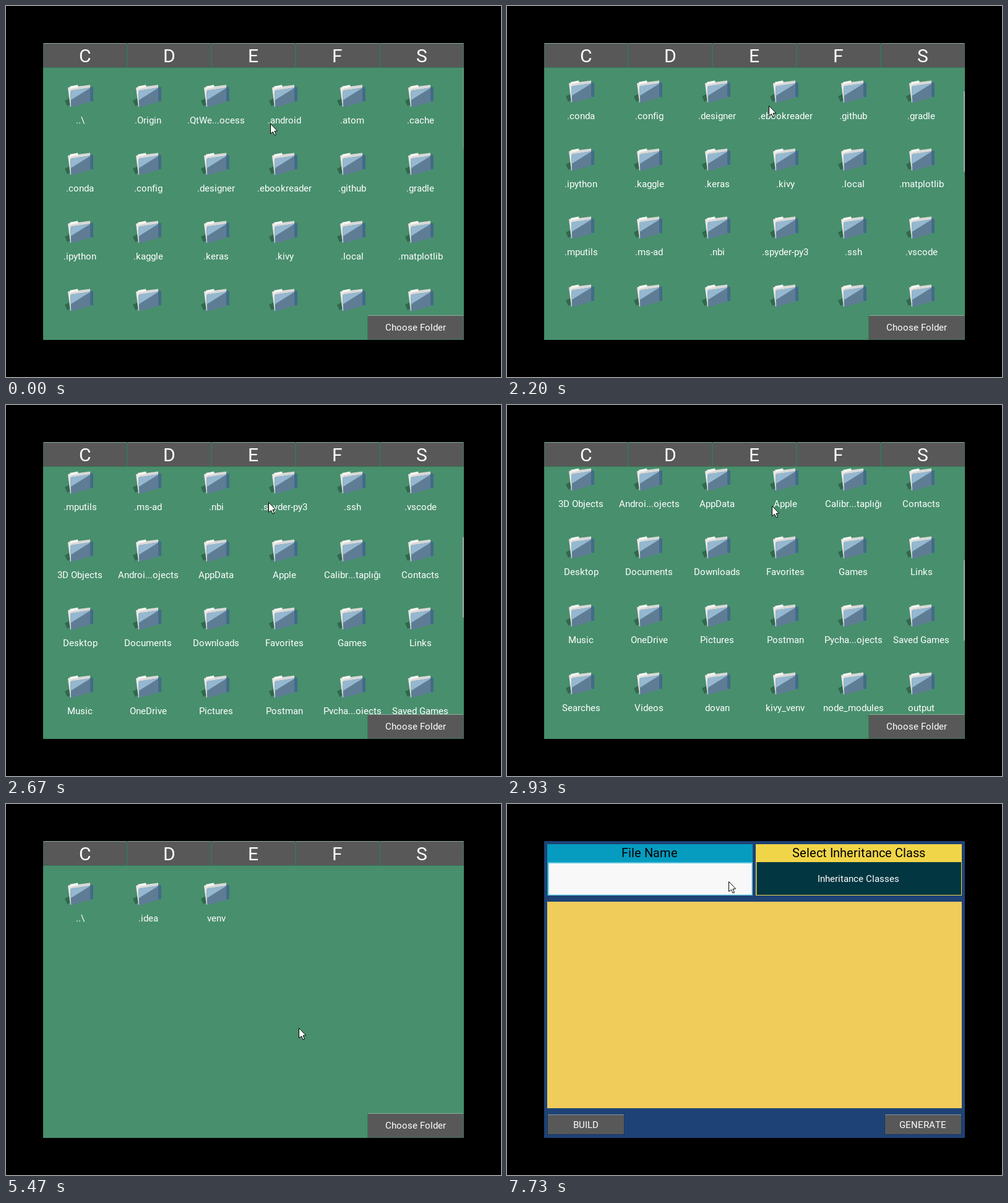
Write an HTML page with a canvas that moves like this. It is 800 px wide and 600 px high and loops after 8000 ms.

```html
<!DOCTYPE html>
<html>
<head>
<meta charset="utf-8">
<style>
html, body { margin: 0; width: 100%; height: 100%; overflow: hidden; background: #000; }
canvas { display: block; }
</style>
</head>
<body>
<canvas id="stage" width="800" height="600"></canvas>
<script>
const ctx = document.getElementById('stage').getContext('2d');
const LOOP = 8000, STEP = 1000 / 15;
const GREEN = '#488f6d', GREY = '#585858';

// Steps at which the screens change
const OPEN_PROJECTS = 63, OPEN_PROJECT = 77, CLOSE = 90, FOCUS = 108, BLINK = 116;

// Entries are "name" for folders and "name:size" for files.
const home = ('..\\|.Origin|.QtWe...ocess|.android|.atom|.cache|' +
  '.conda|.config|.designer|.ebookreader|.github|.gradle|' +
  '.ipython|.kaggle|.keras|.kivy|.local|.matplotlib|' +
  '.mputils|.ms-ad|.nbi|.spyder-py3|.ssh|.vscode|' +
  '3D Objects|Androi...ojects|AppData|Apple|Calibr...taplığı|Contacts|' +
  'Desktop|Documents|Downloads|Favorites|Games|Links|' +
  'Music|OneDrive|Pictures|Postman|Pycha...ojects|Saved Games|' +
  'Searches|Videos|dovan|kivy_venv|node_modules|output|' +
  'seaborn-data|.angul...g.json:175 B|.bash_history:2 KB|.condarc:43 B|' +
  '.emula...token:16 B|.gitconfig:346 B').split('|');
const projects = ('..\\|calculator|chat|clock|converter|dashboard|' +
  'data-reader1|editor|file_tools|forms|game|graphs|' +
  'notes|parser|player|project|scripts|timer').split('|');
const project = ['..\\', '.idea', 'venv'];

// Moves: [first step, last step, ...where it ends]
const pointerMoves = [
  [3, 9, 646, 492], [9, 18, 411, 299], [18, 23, 402, 410], [23, 29, 425, 171],
  [30, 36, 420, 150], [36, 44, 428, 163], [44, 51, 448, 212],
  [53, 57, 590, 200], [57, 60, 568, 214], [62, 75, 473, 362],
  [82, 89, 700, 533], [89, 93, 681, 520], [96, 108, 382, 127], [110, 111, 358, 125]
];
const scrollMoves = [[30, 36, 234], [36, 44, 465], [44, 51, 592]];

const clamp = u => Math.min(1, Math.max(0, u));
const linear = u => u;
const smooth = u => u * u * (3 - 2 * u);

function travel(from, moves, k, ease) {
  return moves.reduce((pos, [a, b, ...to]) => {
    const u = ease(clamp((k - a) / (b - a)));
    return pos.map((v, i) => v + (to[i] - v) * u);
  }, from);
}

function rect(x, y, w, h, color) {
  ctx.fillStyle = color;
  ctx.fillRect(x, y, w, h);
}

function poly(color, ...p) {
  ctx.beginPath();
  for (let i = 0; i < p.length; i += 2) ctx.lineTo(p[i], p[i + 1]);
  ctx.closePath();
  ctx.fillStyle = color;
  ctx.fill();
}

// A box whose right side is raised and whose foot is pushed sideways
function slab(color, x, y, w, h, rise, lean) {
  poly(color, x, y, x + w, y - rise, x + w + lean, y + h - rise, x + lean, y + h);
}

// Glyphs sit on whole pixels with whole-pixel advances.
function text(s, center, baseline, size = 15, color = '#fff') {
  ctx.font = size + 'px Roboto, sans-serif';
  ctx.fillStyle = color;
  const widths = [...s].map(c => Math.round(ctx.measureText(c).width));
  let x = Math.floor(center - widths.reduce((a, b) => a + b) / 2);
  [...s].forEach((c, i) => {
    ctx.fillText(c, x, baseline);
    x += widths[i];
  });
}

function button(x, y, w, h, label, size = 15) {
  rect(x + 1, y + 1, w - 2, h - 2, GREY);
  ctx.strokeStyle = 'rgba(0,0,0,.2)';
  ctx.lineWidth = 1;
  ctx.strokeRect(x + .5, y + .5, w - 1, h - 1);
  rect(x + 1, y, w - 2, 1, 'rgba(190,205,198,.65)');
  text(label, x + w / 2, y + h / 2 + Math.round(size * .355), size);
}

// Icons are placed relative to the centre of their label.
function folder() {
  slab('rgba(25,65,45,.5)', -25, -32, 8, 9, 4, 4);
  slab('#d8d9d7', -19, -53, 35, 8, 4.5, 0);
  slab('#e8e8e5', -20, -53, 5, 31, 1, 4);
  slab('#f4f4f2', -17, -55, 13, 4, 2.5, 1);
  poly('#5e7d95', -16, -48, 17, -53, 20, -31, -15, -21);
  poly('#95b8d0', -16, -48, 17, -53, -15, -33);
  slab('#426b88', 16, -54, 5, 23, 0, 0);
}

function file() {
  slab('rgba(25,65,45,.55)', -25, -37, 15, 16, 8, 4);
  slab('#fafafa', -13, -58, 28, 40, 4, 6);
  slab('#ececec', -3, -37, 21, 17, 5, 2);
  slab('#94a0cf', -12, -58, 6, 39, 1, 6);
  poly('#d3d5d6', 10, -62, 17, -55, 12, -56);
}

function list(items, offset) {
  ctx.save();
  ctx.beginPath();
  ctx.rect(60, 100, 680, 400);
  ctx.clip();
  items.forEach((item, i) => {
    const [name, size] = item.split(':');
    ctx.save();
    ctx.translate(120 + i % 6 * 110, 185 + Math.floor(i / 6) * 110 - offset);
    size ? file() : folder();
    text(name, 0, 5);
    if (size) text(size, 0, 22, 11, '#ccc');
    ctx.restore();
  });
  ctx.restore();
}

function homeList(k) {
  const offset = Math.round(travel([0], scrollMoves, k, linear)[0]);
  list(home, offset);
  const active = k > 30 ? 1 - clamp((k - 53) / 4) : 0;
  rect(738, 100 + offset * .325, 2, 130, `rgba(179,179,179,${.2 + .7 * active})`);
}

function browser(k) {
  rect(60, 60, 680, 480, GREEN);
  if (k < OPEN_PROJECTS) homeList(k);
  else list(k < OPEN_PROJECT ? projects : project, 0);
  [...'CDEFS'].forEach((c, i) => button(60 + i * 136, 60, 136, 40, c, 30));
  button(584, 500, 156, 40, 'Choose Folder');
}

function form(k) {
  const focused = k >= FOCUS;
  rect(60, 60, 680, 480, '#1e4275');
  rect(65, 65, 332, 83, '#059cc0');
  text('File Name', 231, 86, 20, '#000');
  rect(66, 94, 331, 54, focused ? '#5cc3de' : '#c4c4c4');
  rect(67.5, 96, 328, 50.5, '#f8f8f8');
  if (focused && k < BLINK) rect(71, 99, 1, 36, '#f00');
  rect(402, 65, 333, 83, '#f1d548');
  text('Select Inheritance Class', 569, 86, 20, '#000');
  rect(403.5, 94, 330.5, 53, '#023641');
  text('Inheritance Classes', 568.5, 126);
  rect(65, 158, 670, 334, '#f0cc5b');
  button(65, 502, 125, 33, 'BUILD');
  button(610, 502, 125, 33, 'GENERATE');
}

function arrow(x, y) {
  ctx.save();
  ctx.translate(x + .5, y + .5);
  poly('#fff', 0, 0, 0, 16, 4, 13, 6.5, 18.5, 9, 17.5, 6.5, 12, 11, 11.5);
  ctx.strokeStyle = '#000';
  ctx.lineWidth = 1;
  ctx.stroke();
  ctx.restore();
}

function draw(now) {
  const k = Math.floor((now % LOOP + 5) / STEP) % 120;
  const alpha = clamp((CLOSE + 2.5 - k) / 2);
  rect(0, 0, 800, 600, '#000');
  if (alpha < 1) form(k);
  ctx.globalAlpha = alpha;
  if (alpha) browser(k);
  ctx.globalAlpha = 1;
  arrow(...travel([427, 190], pointerMoves, k, smooth).map(Math.round));
}

const start = performance.now();
(function tick() {
  draw(performance.now() - start);
  requestAnimationFrame(tick);
})();
</script>
</body>
</html>
```
